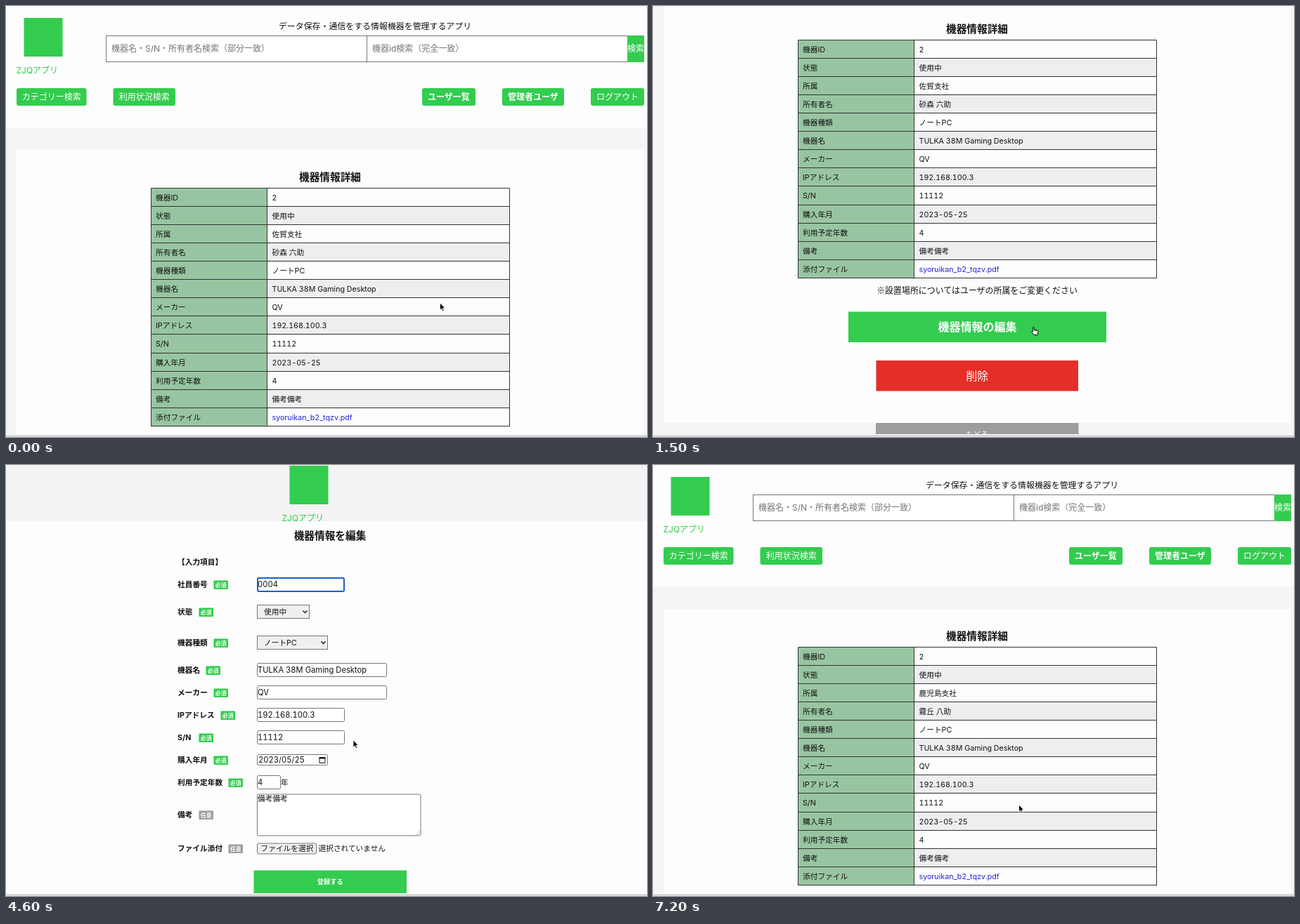
An HTML page that plays this animation: 912x614 px, repeating every 7300 ms.

```html
<!DOCTYPE html>
<html lang="ja">
<head>
<meta charset="utf-8">
<title>機器管理</title>
<style>
html, body { margin: 0; width: 100%; height: 100%; overflow: hidden; background: #fdfdfd; }
svg { display: block; width: 912px; height: 614px; }
text { font-family: Inter, "Noto Sans CJK JP", "Noto Sans CJK", sans-serif; font-variant-numeric: tabular-nums; white-space: pre; }
.note text { font-family: "Noto Sans CJK JP", "Noto Sans CJK", sans-serif; }
</style>
</head>
<body>
<svg id="stage" viewBox="0 0 912 614" xmlns="http://www.w3.org/2000/svg"></svg>
<script>
const LOOP = 7300, STEP = 100;
const GREEN = '#33cc4f', GRAY = '#9d9d9d', WHITE = '#fdfdfd', BORDER = '#767676';
const APP = 'ZJQアプリ', DEVICE = 'TULKA 38M Gaming Desktop', MAKER = 'QV';

const rect = (x, y, w, h, fill, extra = '') =>
  `<rect x="${x}" y="${y}" width="${w}" height="${h}" fill="${fill}" ${extra}/>`;

// y is the vertical middle of the glyphs
const text = (x, y, str, { size = 10.7, fill = '#111', bold, mid, id } = {}) =>
  `<text x="${x}" y="${(y + size * 0.37).toFixed(2)}" font-size="${size}" fill="${fill}"` +
  `${bold ? ' font-weight="700"' : ''}${mid ? ' text-anchor="middle"' : ''}${id ? ` id="${id}"` : ''}>${str}</text>`;

const button = (x, y, w, h, label, { fill = GREEN, size = 12, bold, r = 0 } = {}) =>
  rect(x, y, w, h, fill, `rx="${r}"`) + text(x + w / 2, y + h / 2, label, { size, bold, fill: '#fff', mid: true });

const box = (x, y, w, h, fill = '#fff', r = 2) =>
  rect(x + .5, y + .5, w - 1, h - 1, fill, `rx="${r}" stroke="${BORDER}"`);

const logo = (x, y) =>
  rect(x + 10.5, y, 55, 55, GREEN) + text(x - .5, y + 74.5, APP, { size: 12, fill: GREEN });

function detailPage() {
  const rows = [
    ['機器ID', '2'], ['状態', '使用中'], ['所属', '', 'branch'], ['所有者名', '', 'owner'],
    ['機器種類', 'ノートPC'], ['機器名', DEVICE], ['メーカー', MAKER], ['IPアドレス', '192.168.100.3'],
    ['S/N', '11112'], ['購入年月', '2023-05-25'], ['利用予定年数', '4'], ['備考', '備考備考'],
    ['添付ファイル', 'syoruikan_b2_tqzv.pdf']
  ];
  const top = 259.5, pitch = 26.12, bottom = top + pitch * rows.length;
  let table = rect(206.5, top, 165, bottom - top, '#98c5a1');
  let lines = '';
  rows.forEach(([label, value, id], i) => {
    const y = top + i * pitch, c = y + pitch / 2;
    if (i % 2) table += rect(371.5, y, 345, pitch, '#eeeef0');
    table += text(213, c, label) + text(378.5, c, value, { id, fill: i === 12 ? '#2323d8' : '#111' });
    lines += `M206.5 ${Math.round(y) - .5}H716.5`;
  });
  lines += `M206.5 ${Math.round(bottom) - .5}H716.5`;
  for (const x of [206.5, 371.5, 716.5]) lines += `M${x} ${top}V${bottom}`;

  return rect(0, 0, 912, 173, WHITE) + rect(0, 173, 912, 800, '#f5f5f5') + rect(15, 205, 893, 600, WHITE) +
    logo(15, 17) +
    text(525, 28.5, 'データ保存・通信をする情報機器を管理するアプリ', { size: 11.93, mid: true }) +
    box(142, 42, 372, 38, '#fff', 0) + box(513, 42, 372, 38, '#fff', 0) +
    text(150, 61, '機器名・S/N・所有者名検索（部分一致）', { size: 12, fill: '#757575' }) +
    text(521, 61, '機器id検索（完全一致）', { size: 12, fill: '#757575' }) +
    button(884, 42, 24, 38, '検索') +
    button(15, 117, 99.5, 25, 'カテゴリー検索', { r: 3 }) +
    button(152.5, 117, 88.5, 25, '利用状況検索', { r: 3 }) +
    button(592, 117, 76, 25, 'ユーザ一覧', { r: 3, bold: true }) +
    button(706, 117, 88, 25, '管理者ユーザ', { r: 3, bold: true }) +
    button(832, 117, 76, 25, 'ログアウト', { r: 3 }) +
    text(461, 244, '機器情報詳細', { size: 14.67, bold: true, mid: true }) +
    table + `<path d="${lines}" stroke="#333" fill="none"/>` +
    `<g class="note">${text(461, 616.5, '※設置場所についてはユーザの所属をご変更ください', { size: 11.95, mid: true })}</g>` +
    button(278, 646.5, 367, 43.5, '機器情報の編集', { size: 16, bold: true }) +
    button(317.5, 716, 287.5, 43.5, '削除', { size: 16, fill: '#e62e28' }) +
    button(317, 805, 288.5, 32, 'もどる', { size: 10.7, fill: GRAY });
}

function editPage() {
  const S = { size: 11.2 };
  const labels = [
    [170, '社員番号', 296], [209, '状態', 275], [253, '機器種類', 296], [292, '機器名', 285],
    [324, 'メーカー', 296], [356, 'IPアドレス', 306], [388, 'S/N', 275], [420, '購入年月', 296],
    [452, '利用予定年数', 317], [498, '備考', 275, true], [546, 'ファイル添付', 317, true]
  ].map(([y, label, x, optional]) =>
    text(244, y, label, { bold: true }) +
    button(x - .5, y - 5.5, 20.5, 12.5, optional ? '任意' : '必須',
      { size: 8, bold: true, fill: optional ? GRAY : GREEN, r: 1 })).join('');
  const field = (y, w, value, id) => box(357, y - 10, w, 20) + text(358, y, value, { ...S, id });
  const select = (y, w, value) => box(357, y - 10, w, 20, '#efefef', 0) + text(367, y, value) +
    `<path d="M${357 + w - 9.5} ${y - 1.5}l3 3 3-3" fill="none" stroke="#222" stroke-width="1.5"/>`;

  return rect(0, -60, 912, 140, '#f3f3f3') + logo(393, 1) + rect(0, 80.5, 912, 700, WHITE) +
    text(461, 100.5, '機器情報を編集', { size: 14.67, bold: true, mid: true }) +
    text(244, 138, '【入力項目】', { bold: true }) + labels +
    field(170, 125, '', 'number') +
    rect(358, 161, 123, 19, 'none', 'id="ring" rx="2" stroke="#1c5fd0" stroke-width="2"') +
    select(209, 75, '使用中') + select(253, 101, 'ノートPC') +
    field(292, 185, DEVICE) + field(324, 185, MAKER) + field(356, 125, '192.168.100.3') + field(388, 125, '11112') +
    box(357, 412, 101, 16) + text(359, 420.3, '2023/05/25', S) +
    '<path d="M446 417.5h8v7h-8z" fill="none" stroke="#111"/>' + rect(445.5, 416, 9, 2.5, '#111') +
    field(452, 34, '4') + text(391, 452, '年') +
    box(357, 468.5, 233.5, 60) + text(358, 475.5, '備考備考') +
    '<path d="M583 527l6-6m-3 6l3-3" stroke="#999" stroke-width=".6"/>' +
    box(357, 538.5, 85, 16, '#efefef') + text(362.5, 546.5, 'ファイルを選択') +
    text(444.5, 546.5, '選択されていません') +
    `<g id="submit">${button(352.5, 577.5, 217.5, 33, '登録する', { size: 9.3, bold: true })}</g>` +
    button(355.5, 626.5, 211.5, 32, 'もどる', { size: 10.7, fill: GRAY });
}

const cursors = {
  arrow: '<path d="M0 0V10.2L2.4 8 4 11.7 5.7 11 4.1 7.4H7.2Z" fill="#000" stroke="#fff" stroke-width=".8"/>',
  hand: '<path d="M2.7 6.4V1.2Q3.4 .2 4.2 1.2V4.7L9 5.5Q10.2 5.8 10 7.5L9 12H4L.6 7.8Q1 6.3 2.7 7.5Z" fill="#fff" stroke="#000"/><path d="M5.7 5v2M7.5 5.3v2" stroke="#000" stroke-width=".7"/>',
  beam: '<path d="M-2.2 0Q0 0 0 1.5Q0 0 2.2 0M0 1V11M-2.2 12Q0 12 0 10.5Q0 12 2.2 12" fill="none" stroke="#222"/>'
};

document.getElementById('stage').innerHTML =
  `<g id="detail">${detailPage()}</g><g id="edit">${editPage()}</g>` +
  rect(0, 610, 912, 4, '#f4f4f4') + rect(0, 612, 912, 1, '#b4b4b4') +
  Object.entries(cursors).map(([name, shape]) => `<g id="${name}">${shape}</g>`).join('');

const $ = id => document.getElementById(id);
const show = (id, on) => $(id).setAttribute('display', on ? 'inline' : 'none');
const move = (id, x, y) => $(id).setAttribute('transform', `translate(${x} ${y})`);

// Linear track through [time, value, ...] keys
function track(keys, t) {
  const i = keys.findIndex(k => k[0] > t);
  if (i === 0) return keys[0].slice(1);
  if (i < 0) return keys[keys.length - 1].slice(1);
  const a = keys[i - 1], b = keys[i], p = (t - a[0]) / (b[0] - a[0]);
  return a.slice(1).map((v, n) => v + (b[n + 1] - v) * p);
}

// Whole-pixel scroll keeps the thin lines crisp
const scroll = (keys, t) => -Math.round(track(keys, t)[0]);

const detailScroll = [[0, 0], [300, 4], [500, 11], [600, 16.4], [700, 52], [800, 100], [900, 150],
  [1000, 185], [1100, 203], [1200, 211]];
const editScroll = [[4600, 0], [4700, 8], [4800, 28], [4900, 46], [5000, 53], [5100, 54], [5300, 51]];
const pointer = [[0, 617.5, 423], [1100, 617.5, 423], [1300, 575, 448], [1500, 538, 456.5],
  [2300, 538, 456.5], [2600, 470, 290], [3000, 417, 159.5], [4200, 417, 159.5],
  [4600, 494, 392], [5000, 494, 392], [5400, 511, 541.5], [6700, 511, 541.5], [7100, 520.5, 484]];
const submitOpacity = [[3900, .48], [4200, 1]];

function cursorAt(t) {
  if (t >= 1500 && t < 2300) return 'hand';
  return t >= 3000 && t < 4300 ? 'beam' : 'arrow';
}

function render(time) {
  const t = Math.floor((time % LOOP) / STEP) * STEP;
  const editing = t >= 2300 && t < 6800, saved = t >= 6800;
  show('detail', !editing);
  show('edit', editing);
  move('detail', 0, saved ? 0 : scroll(detailScroll, t));
  move('edit', 0, scroll(editScroll, t));

  $('branch').textContent = saved ? '鹿児島支社' : '佐賀支社';
  $('owner').textContent = saved ? '霧丘 八助' : '砂森 六助';
  $('number').textContent = t < 3800 ? '0005' : t < 4000 ? '000' : '0004';
  show('ring', t >= 3500 && t < 5500);
  $('submit').setAttribute('opacity', track(submitOpacity, t)[0]);

  const active = cursorAt(t), [x, y] = track(pointer, t);
  for (const name in cursors) show(name, name === active);
  move(active, x, y);
}

const start = performance.now();
function loop() {
  render(performance.now() - start);
  requestAnimationFrame(loop);
}
loop();
</script>
</body>
</html>
```
